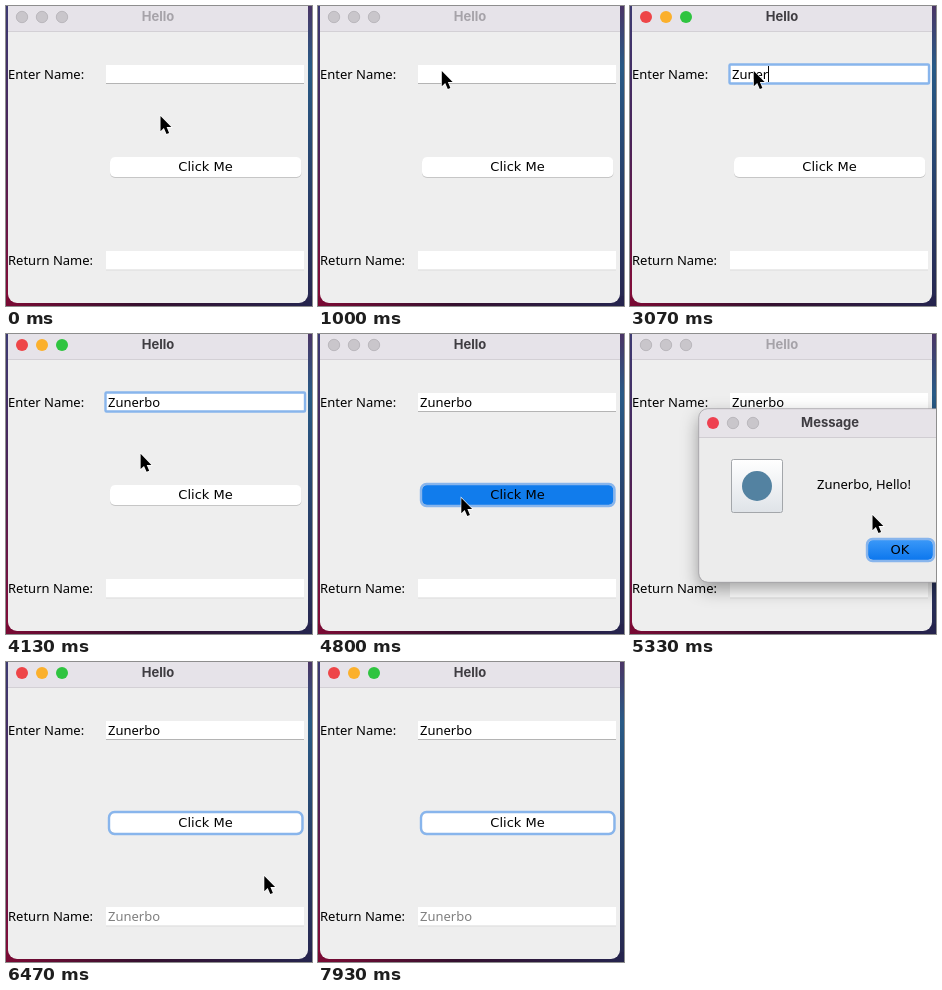
These frames come from a looping animation (306x300 px, 8 s). An HTML page:

```html
<!DOCTYPE html>
<html lang="en">
<head>
<meta charset="utf-8">
<title>Hello</title>
<style>
  html, body { margin: 0; width: 100%; height: 100%; overflow: hidden; }
  svg { display: block; width: 100vw; height: 100vh; }
  text { font: 13px "Noto Sans", sans-serif; white-space: pre; }
  .title { font: 700 13px Inter, sans-serif; text-anchor: middle; fill: #3f3d42; }
  .label { font: 13px "DejaVu Sans", sans-serif; text-anchor: middle; }
  .ring { fill: none; stroke: #88b5ec; stroke-width: 2.4; }
  .off { fill: #c9c6cb; stroke: #b3b0b5; stroke-width: .8; }
  .dialog { filter: drop-shadow(0 7px 9px rgba(0, 0, 0, .38)); }
</style>
</head>
<body>
<svg viewBox="0 0 306 300" preserveAspectRatio="none">
  <defs>
    <linearGradient id="leftEdge" x2="0" y2="1">
      <stop stop-color="#3d3a72"/><stop offset=".45" stop-color="#4a2358"/><stop offset="1" stop-color="#860a36"/>
    </linearGradient>
    <linearGradient id="rightEdge" x2="0" y2="1">
      <stop stop-color="#4a3566"/><stop offset=".2" stop-color="#285a86"/><stop offset="1" stop-color="#27264f"/>
    </linearGradient>
    <linearGradient id="bottomEdge">
      <stop stop-color="#7a0a34"/><stop offset=".45" stop-color="#35102f"/><stop offset="1" stop-color="#25244e"/>
    </linearGradient>
    <linearGradient id="blue" x2="0" y2="1">
      <stop stop-color="#3a98f8"/><stop offset="1" stop-color="#0c77ee"/>
    </linearGradient>
    <linearGradient id="tile" x2="0" y2="1">
      <stop stop-color="#fff"/><stop offset="1" stop-color="#dfe3e8"/>
    </linearGradient>
  </defs>

  <rect width="153" height="300" fill="url(#leftEdge)"/>
  <rect x="153" width="153" height="300" fill="url(#rightEdge)"/>
  <rect y="290" width="306" height="10" fill="url(#bottomEdge)"/>

  <rect x="2" y="-20" width="300" height="317" rx="9" fill="#eee"/>
  <path d="M2 0H302V25H2Z" fill="#e6e3e9"/>
  <path d="M2 25.5H302" stroke="#d3d0d5"/>
  <g id="grayLights" class="off">
    <circle cx="16" cy="11" r="5.7"/><circle cx="36" cy="11" r="5.7"/><circle cx="56" cy="11" r="5.7"/>
  </g>
  <g id="colorLights">
    <circle cx="16" cy="11" r="6" fill="#ee4548"/><circle cx="36" cy="11" r="6" fill="#fbb02c"/><circle cx="56" cy="11" r="6" fill="#2fc440"/>
  </g>
  <text id="title" class="title" x="152" y="15">Hello</text>

  <text x="2" y="73">Enter Name:</text>
  <rect x="100" y="59" width="198" height="18" fill="#fff"/>
  <path d="M100 77.5H298" stroke="#b4b4b4"/>
  <rect id="fieldRing" class="ring" x="99.5" y="58.5" width="199.5" height="19" rx="1"/>
  <text id="entry" x="102" y="73"></text>
  <rect id="caret" y="60" width="1" height="16"/>

  <rect x="104" y="151.5" width="191.5" height="20.5" rx="5" fill="#c6c6c6"/>
  <rect id="button" x="104" y="151" width="191.5" height="20" rx="5"/>
  <rect id="buttonRing" class="ring" x="103" y="150" width="193.5" height="22" rx="5.5"/>
  <text class="label" x="199.5" y="165">Click Me</text>

  <text x="2" y="259">Return Name:</text>
  <rect x="100" y="245" width="198" height="18.5" fill="#fff"/>
  <path d="M100 264H298" stroke="#dedede"/>
  <text id="result" x="102" y="259" fill="#808080"></text>

  <g id="dialog">
    <rect class="dialog" x="69" y="75" width="262" height="173" rx="9" fill="#ececec"/>
    <path d="M69 103V84a9 9 0 0 1 9-9H306V103Z" fill="#e6e3e8"/>
    <path d="M69 103.5H306" stroke="#d0cdd2"/>
    <rect x="68.7" y="74.7" width="262" height="173.6" rx="9" fill="none" stroke="#a5a3a7" stroke-width=".8"/>
    <circle cx="83" cy="89" r="6" fill="#ee4050"/>
    <g class="off"><circle cx="103" cy="89" r="5.7"/><circle cx="123" cy="89" r="5.7"/></g>
    <text class="title" x="200" y="93">Message</text>
    <rect x="101.5" y="125.5" width="51" height="53" rx="2" fill="url(#tile)" stroke="#a3a6aa"/>
    <circle cx="127" cy="152" r="15" fill="#5382a1"/>
    <text id="greeting" x="187" y="155"></text>
    <rect id="ok" x="238" y="206" width="65" height="20" rx="5"/>
    <rect class="ring" x="237" y="205" width="67" height="22" rx="5.5"/>
    <text class="label" x="270" y="220">OK</text>
  </g>

  <path id="pointer" d="M0 0V15.2L3.4 12.1L6 18L8.6 16.9L6.1 11.1H10.8Z" stroke="#fff" stroke-width="1.2" paint-order="stroke"/>
</svg>
<script>
const $ = id => document.getElementById(id);
const LOOP = 8000;
const NAME = "Zunerbo";
const KEY_TIMES = [2470, 2730, 2870, 2930, 3070, 3130, 3270];
const BLINK = 467;

const FOCUS = 1130, PRESS = 4670, DEACTIVATE = 4800, OPEN = 4870;
const OK_PRESS = 6070, CLOSE = 6330, POINTER_HIDE = 7200;

// Pointer stops: time, x, y
const PATH = [
  [0, 154.5, 110], [470, 124.5, 58], [600, 124.5, 58], [1000, 123.8, 65],
  [3670, 123.8, 65], [4530, 143.3, 164], [5130, 143.3, 164],
  [5330, 242.5, 181], [5870, 258.3, 214], [LOOP, 258.3, 214]
];

const show = (id, on) => $(id).setAttribute("visibility", on ? "visible" : "hidden");
const between = (t, from, to) => t >= from && t < to;
const smooth = p => p * p * (3 - 2 * p);

function pointerAt(t) {
  const i = PATH.findIndex(stop => stop[0] > t);
  const [t0, x0, y0] = PATH[i - 1], [t1, x1, y1] = PATH[i];
  const p = smooth((t - t0) / (t1 - t0));
  return [x0 + (x1 - x0) * p, y0 + (y1 - y0) * p];
}

function caretVisible(t) {
  if (!between(t, FOCUS, PRESS)) return false;
  const lastReset = KEY_TIMES.filter(k => k <= t).pop() ?? FOCUS;
  return Math.floor((t - lastReset) / BLINK) % 2 === 0;
}

function render(t) {
  const active = between(t, FOCUS, DEACTIVATE) || t >= CLOSE;
  show("colorLights", active);
  show("grayLights", !active);
  const dimTitle = t < FOCUS || between(t, OPEN, CLOSE);
  $("title").style.fill = dimTitle ? "#a6a3a9" : "";

  $("entry").textContent = NAME.slice(0, KEY_TIMES.filter(k => k <= t).length);
  $("caret").setAttribute("x", 102 + Math.round($("entry").getComputedTextLength()));
  show("caret", caretVisible(t));
  show("fieldRing", between(t, FOCUS, PRESS));

  $("button").setAttribute("fill", between(t, PRESS, OPEN) ? "#117cec" : "#fff");
  show("buttonRing", between(t, PRESS, OPEN) || t >= CLOSE);
  $("result").textContent = t >= CLOSE ? NAME : "";

  $("dialog").style.display = between(t, OPEN, CLOSE) ? "" : "none";
  $("ok").setAttribute("fill", t >= OK_PRESS ? "#0b74e6" : "url(#blue)");

  show("pointer", t < POINTER_HIDE);
  $("pointer").setAttribute("transform", `translate(${pointerAt(t)})`);
}

$("greeting").textContent = `${NAME}, Hello!`;
const start = performance.now();
function tick() {
  render((performance.now() - start) % LOOP);
  requestAnimationFrame(tick);
}
tick();
</script>
</body>
</html>
```
